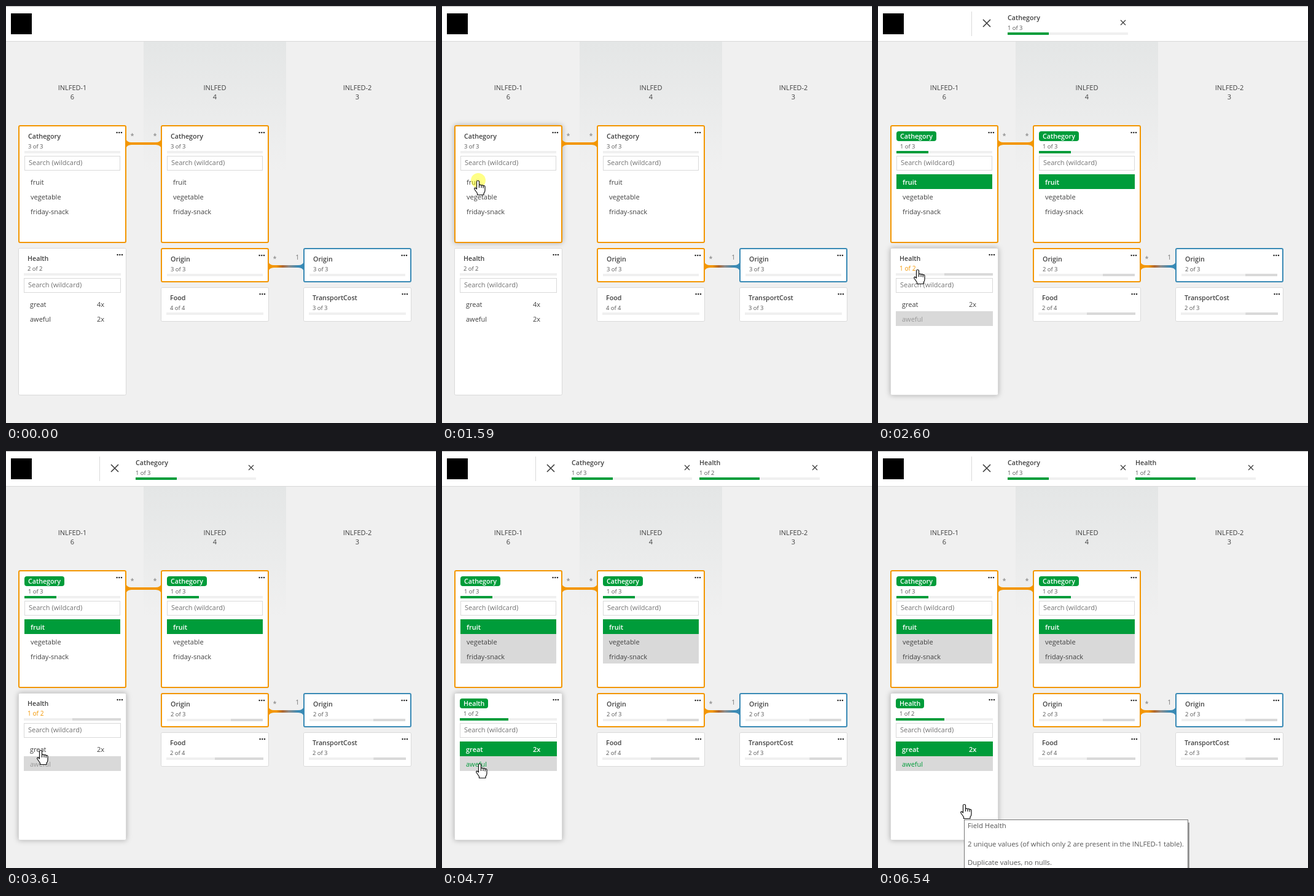
Animation of 700 by 679 pixels, one loop 8 s. Source, as an HTML page:

```html
<!DOCTYPE html>
<html lang="en">
<head>
<meta charset="utf-8">
<style>
html, body { margin: 0; width: 100%; height: 100%; overflow: hidden; background: #f0f0f0; }
svg { display: block; width: 100%; height: 100%; font: 11px "Open Sans", "Noto Sans", sans-serif; }
.title { font-size: 10.7px; font-weight: 600; }
.count { font-size: 9.4px; }
.lift { filter: drop-shadow(0 0 4px rgba(0,0,0,.28)); }
</style>
</head>
<body>
<svg viewBox="0 0 700 679">
  <defs>
    <linearGradient id="fade" x2="0" y2="1">
      <stop stop-color="#e4e6e6"/><stop offset="1" stop-color="#f0f0f0"/>
    </linearGradient>
    <linearGradient id="blend" gradientUnits="userSpaceOnUse" x1="428" x2="484">
      <stop offset=".22" stop-color="#f39600"/><stop offset=".4" stop-color="#b0672f"/>
      <stop offset=".58" stop-color="#8c8c8c"/><stop offset=".85" stop-color="#398ab5"/>
    </linearGradient>
  </defs>
  <g id="scene"></g>
  <circle id="click" r="12" fill="#ff0" fill-opacity=".47"/>
  <g id="cursor" fill="#fff" stroke="#111" stroke-width="1.2" stroke-linejoin="round">
    <path id="arrow" d="M0 0V16l3.700-3.500 2.600 6 2.400-1-2.600-5.800h5z"/>
    <g id="hand">
      <path d="M-2.500 2Q-2.500 .5-.5 .5T1.500 2V7.500q2-1 3.500 .5q2-1 3.200 .7q2.800-.8 2.800 2V16q0 3-2 5v2.500H-1.500V21L-6 14.500q-.8-2 .8-2.300q1.200 0 2.700 1.800z"/>
      <path fill="none" d="M1.500 7.500V12M5 8.500V12M8.200 9V12.500"/>
    </g>
  </g>
  <g id="tip">
    <rect x="144" y="605" width="363" height="80" fill="#000" opacity=".35"/>
    <rect x="140.5" y="600.5" width="364" height="90" fill="#fff" stroke="#767676"/>
    <g fill="#575757" font-size="11.33">
      <text x="146" y="614">Field Health</text>
      <text x="146" y="644">2 unique values (of which only 2 are present in the INLFED-1 table).</text>
      <text x="146" y="674">Duplicate values, no nulls.</text>
    </g>
  </g>
</svg>
<script>
const ORANGE = '#f39600', BLUE = '#398ab5', GREEN = '#009c3a', GREY = '#d9d9d9', PALE = '#f0f0f0', INK = '#404040';
const $ = id => document.getElementById(id);

const rect = (x, y, w, h, fill, extra = '') =>
  `<rect x="${x}" y="${y}" width="${w}" height="${h}" fill="${fill}" ${extra}/>`;
const text = (x, y, s, fill = INK, extra = '') =>
  `<text x="${x}" y="${y}" fill="${fill}" ${extra}>${s}</text>`;
const cross = (x, y, r, w) =>
  `<path d="M${x - r} ${y - r}l${2 * r} ${2 * r}m0 ${-2 * r}l${-2 * r} ${2 * r}" stroke="${INK}" stroke-width="${w}"/>`;

// green part on the left, excluded part on the right
const bar = (x, y, w, green = 0, dark = 0) =>
  rect(x, y, w, 4, PALE) + rect(x, y, w * green, 4, GREEN) + rect(x + w * (1 - dark), y, w * dark, 4, GREY);

const looks = {
  plain: ['none', INK], picked: [GREEN, '#fff'], other: [GREY, INK],
  excluded: [GREY, '#999'], locked: [GREY, GREEN]
};

function row(x, y, w, [name, look, tally = '']) {
  const [back, ink] = looks[look], bold = look == 'picked' ? 'font-weight="600"' : '';
  return rect(x, y, w, 24, back) + text(x + 10, y + 17, name, ink, bold) + text(x + 119, y + 17, tally, ink, bold);
}

function card(c, lifted) {
  const b = c.edge ? 2 : 1, x = c.x + b, y = c.y + b, w = 160 - 2 * b;
  let s = rect(c.x + b / 2, c.y + b / 2, 176 - b, c.h - b, '#fff',
    `rx="2" stroke="${c.edge || GREY}" stroke-width="${b}" ${lifted ? 'class="lift"' : ''}`);
  if (c.pill) s += rect(x + 8, y + 8, c.pill, 16, GREEN, 'rx="4"');
  s += text(x + 14, y + 20, c.name, c.pill ? '#fff' : INK, 'class="title"');
  s += c.warn ? text(x + 14, y + 36, c.count, ORANGE, 'font-size="10.2" font-weight="500"')
              : text(x + 14, y + 36, c.count, '#555', 'class="count"');
  for (let i = 0; i < 3; i++) s += rect(c.x + 161.500 - b + i * 3.700, y + 9, 2.200, 2.200, '#222', 'rx=".6"');
  s += bar(x + 8, y + 40, w, c.green, c.dark);
  if (c.rows) {
    s += rect(x + 8.500, y + 48.500, w - 1, 23, '#fff', `stroke="${GREY}"`);
    s += text(x + 15, y + 63, 'Search (wildcard)', '#737373');
    c.rows.forEach((r, i) => s += row(x + 8, y + 78 + 24 * i, w, r));
  }
  return s;
}

// stage: 0 nothing, 1 fruit, 2 fruit + great, 3 fruit + great + aweful
function cards(stage) {
  const on = stage > 0, both = stage > 1, rest = both ? 'other' : 'plain';
  const cat = {
    y: 194, h: 192, edge: ORANGE, name: 'Cathegory', pill: on && 65, count: on ? '1 of 3' : '3 of 3', green: on ? 1 / 3 : 0,
    rows: [['fruit', on ? 'picked' : 'plain'], ['vegetable', rest], ['friday-snack', rest]]
  };
  const origin = { y: 394, h: 56, name: 'Origin', count: on ? '2 of 3' : '3 of 3', dark: on ? 1 / 3 : 0 };
  return [
    { ...cat, x: 20 },
    { ...cat, x: 252 },
    {
      x: 20, y: 394, h: 240, name: 'Health', pill: both && 46, warn: stage == 1, count: on ? '1 of 2' : '2 of 2',
      green: both ? .5 : 0, dark: stage == 1 || stage == 2 ? .5 : 0,
      rows: [['great', both ? 'picked' : 'plain', on ? '2x' : '4x'],
             ['aweful', ['plain', 'excluded', 'excluded', 'locked'][stage], on ? '' : '2x']]
    },
    { ...origin, x: 252, edge: ORANGE },
    { ...origin, x: 484, edge: BLUE },
    { x: 252, y: 458, h: 56, name: 'Food', count: on ? '2 of 4' : '4 of 4', dark: on ? .5 : 0 },
    { ...origin, x: 484, y: 458, name: 'TransportCost' }
  ];
}

function link(x, y, fill, left, right) {
  const label = (lx, s) => text(lx, y - (s == '*' ? 9.500 : 11), s, '#7a7a7a', 'text-anchor="middle"');
  return `<path fill="${fill}" d="M${x - 1} ${y - 8}q2 6 9 6h40q7 0 9-6v16q-2-6-9-6h-40q-7 0-9 6z"/>` +
    label(x + 9.500, left) + label(x + 46.500, right);
}

const chip = (x, name, count, green, dark) =>
  text(x, 23, name, INK, 'class="title"') + text(x, 39, count, '#555', 'class="count"') +
  bar(x, 43, 196, green, dark) + cross(x + 188, 27, 4, 1.300);

function header(stage) {
  let s = rect(0, 0, 700, 57, '#fff') + rect(0, 0, 700, 1, '#b4b4b4') + rect(0, 57, 700, 1, GREY) + rect(8, 12, 34, 34, '#000');
  if (stage) s += rect(152, 9, 1, 40, GREY) + cross(177, 28, 6, 1.700) + chip(211, 'Cathegory', '1 of 3', .342, 0);
  if (stage > 1) s += chip(419, 'Health', '1 of 2', .5, stage == 2 ? .5 : 0);
  return s;
}

function scene(stage, list, hover) {
  let s = rect(0, 0, 700, 679, PALE) + rect(224, 58, 232, 212, 'url(#fade)') + header(stage);
  [['INLFED-1', 6], ['INLFED', 4], ['INLFED-2', 3]].forEach(([name, n], i) => {
    const x = 108 + 232 * i;
    s += text(x, 137, name, INK, 'text-anchor="middle" font-weight="500"') + text(x, 152, n, INK, 'text-anchor="middle"');
  });
  list.forEach((c, i) => s += card(c, i == hover));
  return s + link(196, 224, ORANGE, '*', '*') + link(428, 424, 'url(#blend)', '*', '1');
}

// pointer path: time, x, y
const path = [
  [360, 535, 631], [900, 128, 310], [1130, 61, 288], [1200, 61, 288], [1360, 59, 284], [2215, 59, 284],
  [2600, 65, 432], [3060, 61, 511], [3390, 61, 511], [3590, 57, 487], [3945, 57, 487],
  [4310, 62, 509], [5935, 62, 509], [6300, 141, 575], [8000, 141, 575]
];

function pointer(t) {
  t = Math.max(360, 360 + 77 * Math.floor((t - 360) / 77 + .1));
  const i = Math.max(1, path.findIndex(p => p[0] >= t));
  const [t0, x0, y0] = path[i - 1], [t1, x1, y1] = path[i], k = (t - t0) / (t1 - t0);
  return [Math.round(x0 + (x1 - x0) * k), Math.round(y0 + (y1 - y0) * k)];
}

const show = (id, on) => $(id).setAttribute('display', on ? 'inline' : 'none');
const clicks = [[1590, 1750], [3700, 3770], [4540, 4620]];
let drawn = '';

function frame(now) {
  const t = now % 8000, stage = [1750, 3770, 4690].filter(s => t >= s).length;
  const [x, y] = pointer(t), list = cards(stage);
  const hover = t < 360 ? -1 : list.findIndex(c => x >= c.x && x < c.x + 176 && y >= c.y && y < c.y + c.h);
  const key = stage + '/' + hover;
  if (key != drawn) $('scene').innerHTML = scene(stage, list, hover);
  drawn = key;
  $('cursor').setAttribute('transform', `translate(${x} ${y})`);
  $('click').setAttribute('transform', `translate(${x} ${y})`);
  show('cursor', t >= 360);
  show('hand', hover >= 0);
  show('arrow', hover < 0);
  show('click', clicks.some(([a, b]) => t >= a && t < b));
  show('tip', t >= 6540);
  requestAnimationFrame(frame);
}
frame(0);
</script>
</body>
</html>
```
